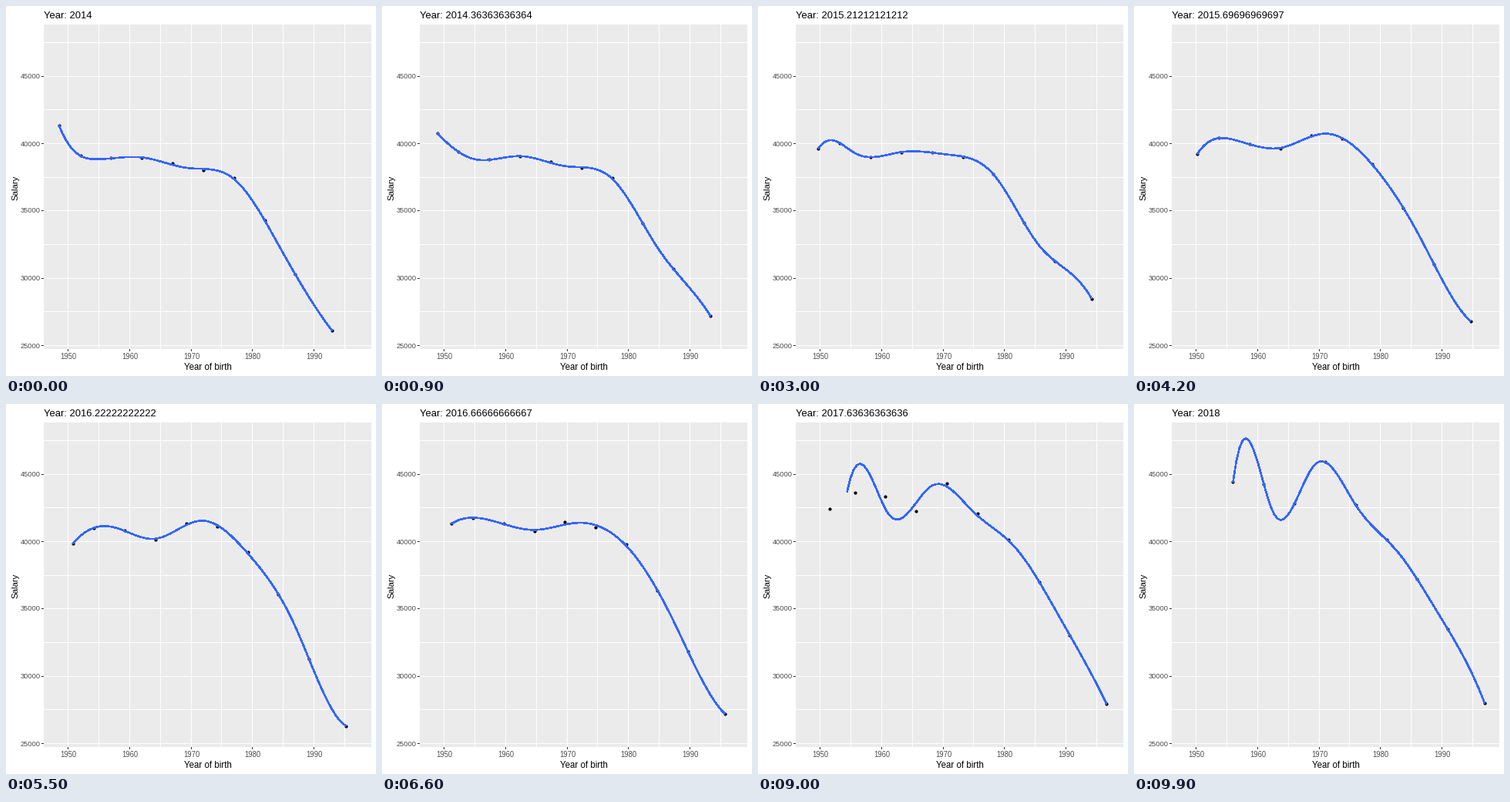
A matplotlib script for the animation above (10 s loop, 480 by 480 pixels).

```python
import numpy as np
import matplotlib.pyplot as plt
from matplotlib.animation import FuncAnimation

SIZE, DPI = 480, 80
PX = 72 / DPI                         # one pixel in points
FRAMES = 100
KEYS = np.array([0, 25, 49, 74, 99])  # frames at which a survey year is reached
LEFT, RIGHT, TOP, BOTTOM = 48.5, 473.5, 23.5, 444.5

plt.rcParams["font.family"] = "Liberation Sans"

# Mean salary (thousands) of each birth cohort, one row per survey year;
# the oldest cohort has left by 2018.
BORN = np.array([1948.5, *range(1952, 1988, 5), 1993])
SALARY = [
    [41.35, 39.09, 38.92, 38.92, 38.52, 38.03, 37.43, 34.28, 30.28, 26.10],
    [39.80, 39.88, 38.60, 39.24, 38.84, 38.46, 37.43, 33.65, 31.39, 29.20],
    [39.03, 40.62, 40.52, 39.80, 41.32, 41.12, 38.89, 35.88, 30.93, 25.83],
    [42.41, 42.31, 41.72, 41.22, 41.49, 41.01, 40.19, 36.63, 32.31, 27.89],
    [44.41, 44.29, 42.81, 45.90, 42.69, 40.12, 37.20, 33.48, 27.99],
]


def sx(year):
    return 80.2 + 7.966 * (year - 1950)


def sy(thousands):
    return 440.2 - 17.48 * (thousands - 25)


def spline_fit(x, y, df=8, n=80):
    """Least-squares cubic regression spline with knots at quantiles of x."""
    t = (x - x[0]) / (x[-1] - x[0])
    inner = df - 3
    knots = np.quantile(t, np.arange(1, inner + 1) / (inner + 1))

    def basis(u):
        u = u[:, None]
        return np.hstack([u ** np.arange(4), np.maximum(u - knots, 0) ** 3])

    coef = np.linalg.lstsq(basis(t), y, rcond=None)[0]
    return np.linspace(x[0], x[-1], n), basis(np.linspace(0, 1, n)) @ coef


dot_x, dot_y, line_x, line_y = [], [], [], []
for k, row in enumerate(SALARY):
    row = np.array(row)
    gone = len(BORN) - len(row)
    x, y = sx(BORN[gone:] + k), sy(row)
    lx, ly = spline_fit(x, y)
    line_x.append(lx)
    line_y.append(ly)
    # a cohort that has left keeps its last place
    dot_x.append(np.append(dot_x[-1][:gone] if gone else [], x))
    dot_y.append(np.append(dot_y[-1][:gone] if gone else [], y))

fig = plt.figure(figsize=(SIZE / DPI, SIZE / DPI), dpi=DPI, facecolor="white")
ax = fig.add_axes([0, 0, 1, 1])
ax.set(xlim=(-0.5, SIZE - 0.5), ylim=(SIZE - 0.5, -0.5))
ax.axis("off")


def seg(x, y, color):
    ax.plot(x, y, color=color, lw=PX, snap=False, solid_capstyle="butt",
            zorder=1)


def label(x, y, s, size, color="black", **kw):
    return ax.text(x, y, s, fontsize=size * PX, color=color,
                   va="baseline", **kw)


ax.add_patch(plt.Rectangle((LEFT, TOP), RIGHT - LEFT, BOTTOM - TOP,
                           fc="#EBEBEB", ec="none", zorder=0))
for year in range(1950, 2000, 5):
    x = round(sx(year))
    seg([x, x], [TOP, BOTTOM], "white")
    if year % 10 == 0:
        seg([x, x], [BOTTOM, BOTTOM + 3], "#333333")
        label(x, 458, str(year), 9.5, "#4D4D4D", ha="center")
for salary in range(25000, 50000, 2500):
    y = round(sy(salary / 1000))
    seg([LEFT, RIGHT], [y, y], "white")
    if salary % 5000 == 0:
        seg([LEFT - 3, LEFT], [y, y], "#333333")
        label(44, y + 3, str(salary), 9.3, "#4D4D4D", ha="right")

label(261, 472, "Year of birth", 11.5, ha="center")
label(14.5, 235, "Salary", 11.4, ha="center", rotation=90,
      rotation_mode="anchor")
title = label(48.7, 16, "", 13, ha="left")

dots, = ax.plot([], [], "o", color="black", ms=4.2 * PX, mew=0, zorder=3)
trend, = ax.plot([], [], color="#3366FF", lw=1.6 * PX, antialiased=False,
                 solid_capstyle="butt", solid_joinstyle="round", zorder=4)


def draw(frame):
    k = min(np.searchsorted(KEYS, frame, side="right") - 1, len(KEYS) - 2)
    f = (frame - KEYS[k]) / (KEYS[k + 1] - KEYS[k])

    def mix(rows):
        return (1 - f) * rows[k] + f * rows[k + 1]

    first = int(frame == FRAMES - 1)   # oldest cohort vanishes in 2018
    dots.set_data(mix(dot_x)[first:], mix(dot_y)[first:])
    trend.set_data(mix(line_x), mix(line_y))
    title.set_text(f"Year: {2014 + 4 * frame / (FRAMES - 1):.15g}")
    return dots, trend, title


anim = FuncAnimation(fig, draw, frames=FRAMES, interval=100, repeat=True,
                     repeat_delay=0)
plt.show()
```
